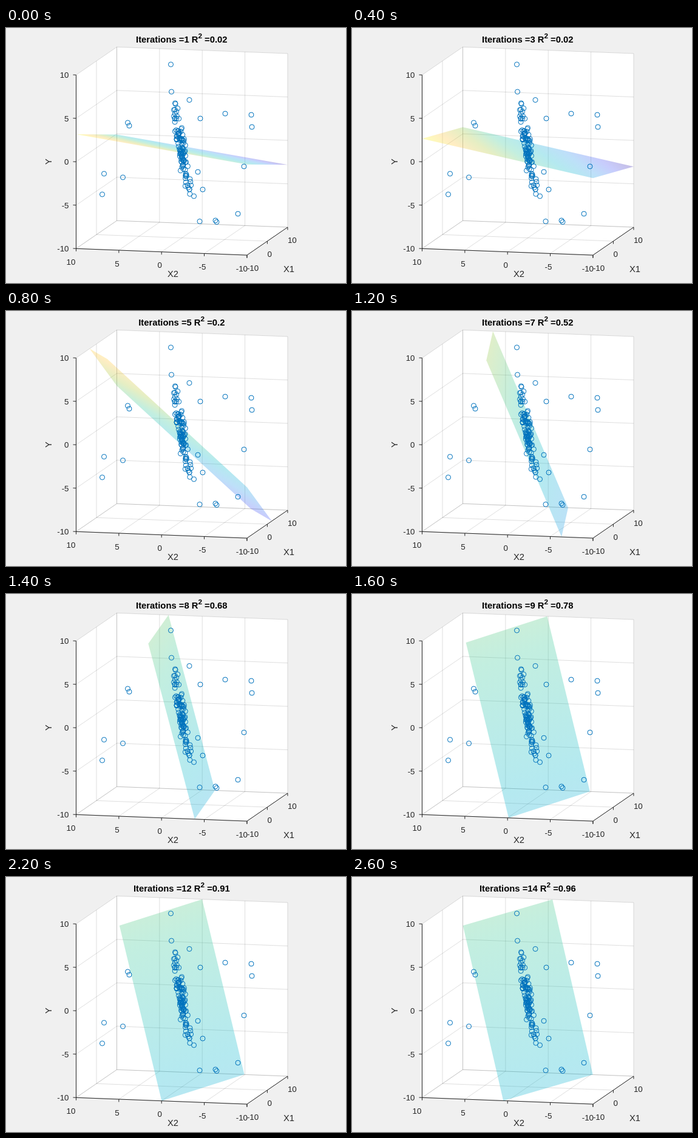
An HTML page with a canvas for the animation above (5600 ms loop, 560 by 420 pixels).

```html
<!DOCTYPE html>
<html lang="en">
<head>
<meta charset="utf-8">
<title>Plane fit</title>
<style>
html, body { margin: 0; width: 100%; height: 100%; overflow: hidden; background: #f0f0f0; }
canvas { display: block; }
</style>
</head>
<body>
<canvas id="stage" width="560" height="420"></canvas>
<script>
const ctx = document.getElementById('stage').getContext('2d');
const FONT = '"Liberation Sans", Arial, sans-serif';
const INK = '#262626', STEPS = 14;

// Key fits: iteration, then Y = a + b*X2 + c*X1 and R squared
const keys = [
  [1, .18, .136, -.163, .02], [3, -.18, .19, -.0945, .02], [5, -.28, .865, -.48, .2],
  [8, -.12, 3.68, -.44, .68], [9, 0, 4, .95, .78], [10, 0, 4.11, .855, .84],
  [12, 0, 4.05, .996, .91], [14, 0, 4.23, 1.21, .96]
];
const parula = ['62,38,168', '71,85,246', '39,151,235', '8,183,204',
  '55,200,151', '171,199,57', '254,195,56', '249,251,21'];

// The slope b grows geometrically between keys, the rest linearly
function fitAt(n) {
  const i = Math.max(1, keys.findIndex(k => k[0] >= n));
  const [n0, a0, b0, c0, r0] = keys[i - 1], [n1, a1, b1, c1, r1] = keys[i];
  const t = (n - n0) / (n1 - n0), mix = (p, q) => p + (q - p) * t;
  return { a: mix(a0, a1), b: b0 * (b1 / b0) ** t, c: mix(c0, c1), r2: mix(r0, r1) };
}

// Orthographic view of the box: u = X2, v = X1, w = Y
const UX = -14.07, UY = -.54, VX = 3.35, VY = -2.3, WY = -14.3;
const project = (u, v, w) => [
  115.5 + (u - 10) * UX + (v + 10) * VX,
  363.3 + (u - 10) * UY + (v + 10) * VY + (w + 10) * WY
];

// Outliers, then a narrow slanted cloud
const points = [
  [271.5, 60], [272.5, 105], [302, 118.5], [320, 149], [361, 141], [404, 143], [405, 163],
  [392, 228], [382, 306], [345, 317], [347, 319.5], [319, 318.5], [324, 266],
  [316, 237], [309.5, 277], [200.5, 156], [203, 161], [161.5, 240], [158.5, 274], [192.5, 246]
];
let seed = 4242;
const rand = () => (seed = seed * 16807 % 2147483647) / 2147483647;
const spread = () => rand() + rand() - 1;
for (let i = 0; i < 108; i++) {
  const y = 200 + 80 * spread();
  points.push([289 + (y - 200) * .16 + 8 * spread(), y]);
}

function path(pts) {
  ctx.beginPath();
  pts.forEach(p => ctx.lineTo(...p));
}
function line(color, ...pts) {
  path(pts);
  ctx.strokeStyle = color;
  ctx.stroke();
}
function text(str, x, y, size = 13.33, align = 'center', weight = '') {
  ctx.font = `${weight} ${size}px ${FONT}`;
  ctx.textAlign = align;
  ctx.fillText(str, x, y);
}

function drawBox() {
  ctx.fillStyle = '#fff';
  path([project(10, -10, -10), project(10, -10, 10), project(10, 10, 10),
    project(-10, 10, 10), project(-10, 10, -10), project(-10, -10, -10)]);
  ctx.fill();
  const grid = 'rgba(38,38,38,.15)';
  for (let k = -10; k <= 10; k += 5) {
    line(grid, project(k, -10, -10), project(k, 10, -10), project(k, 10, 10));
    line(grid, project(10, -10, k), project(10, 10, k), project(-10, 10, k));
    if (k % 10 === 0) line(grid, project(10, k, 10), project(10, k, -10), project(-10, k, -10));
  }
}

function drawAxes() {
  line(INK, project(10, -10, 10), project(10, -10, -10), project(-10, -10, -10), project(-10, 10, -10));
  ctx.fillStyle = INK;
  const tick = ([x, y], dx, dy) => line(INK, [x, y], [x + dx, y + dy]);
  for (let k = -10; k <= 10; k += 5) {
    const y = project(10, -10, k), x2 = project(k, -10, -10), x1 = project(-10, k, -10);
    tick(y, -5, -.2);
    text(k, 103.5, y[1] + 4.7, 13.33, 'right');
    tick(x2, 0, 4.5);
    text(k, x2[0] - (Math.abs(k) > 5 ? 8.5 : 3), x2[1] + 26.5);
    if (k % 10 === 0) {
      tick(x1, 0, 4.5);
      text(k, x1[0], x1[1] + 26.2, 13.33, 'left');
    }
  }
  text('X2', 275, 409.5, 14.67);
  text('X1', 466, 402, 14.67);
  ctx.save();
  ctx.translate(75, 220);
  ctx.rotate(-Math.PI / 2);
  text('Y', 0, 0, 14.67);
  ctx.restore();
}

// Keep the part of a polygon where f >= 0
function clip(poly, f) {
  return poly.flatMap((p, i) => {
    const q = poly[(i + 1) % poly.length], d = f(p), e = f(q), out = d >= 0 ? [p] : [];
    if (d * e < 0) out.push(p.map((n, j) => n + (q[j] - n) * d / (d - e)));
    return out;
  });
}

function drawPlane({ a, b, c }) {
  const height = ([u, v]) => a + b * u + c * v;
  let poly = [[10, -10], [10, 10], [-10, 10], [-10, -10]];
  poly = clip(poly, p => 10 - height(p));
  poly = clip(poly, p => 10 + height(p));

  // The screen-space slope of the height gives the direction of the colour ramp
  const su = UY + WY * b, sv = VY + WY * c, det = UX * sv - VX * su;
  const gx = (b * sv - c * su) / det, gy = (UX * c - VX * b) / det;
  const k = 10 * (Math.abs(b) + Math.abs(c)) / (gx * gx + gy * gy);
  const [x, y] = project(0, 0, a);
  const ramp = ctx.createLinearGradient(x - gx * k, y - gy * k, x + gx * k, y + gy * k);
  parula.forEach((rgb, i) => ramp.addColorStop(i / 7, `rgba(${rgb},.3)`));
  path(poly.map(p => project(...p, height(p))));
  ctx.fillStyle = ramp;
  ctx.fill();
}

function drawPoints() {
  ctx.strokeStyle = '#0072bd';
  for (const [x, y] of points) {
    ctx.beginPath();
    ctx.arc(x, y, 4, 0, 7);
    ctx.stroke();
  }
}

function drawTitle(n, r2) {
  const parts = [[`Iterations =${n} R`, 14.8, 24], ['2', 11.8, 17], [` =${+r2.toFixed(2)}`, 14.8, 24]];
  const widths = parts.map(([s, size]) => {
    ctx.font = `bold ${size}px ${FONT}`;
    return ctx.measureText(s).width;
  });
  let x = 289.3 - widths.reduce((s, w) => s + w) / 2;
  ctx.fillStyle = '#000';
  parts.forEach(([s, size, y], i) => {
    text(s, x, y, size, 'left', 'bold');
    x += widths[i];
  });
}

function draw(now) {
  const n = Math.min(STEPS, 1 + Math.floor(now % 5600 / 200));
  const fit = fitAt(n);
  ctx.fillStyle = '#f0f0f0';
  ctx.fillRect(0, 0, 560, 420);
  drawBox();
  drawPlane(fit);
  drawPoints();
  drawAxes();
  drawTitle(n, fit.r2);
}

let start;
function loop(now) {
  start ??= now;
  draw(now - start);
  requestAnimationFrame(loop);
}
draw(0);
requestAnimationFrame(loop);
</script>
</body>
</html>
```
